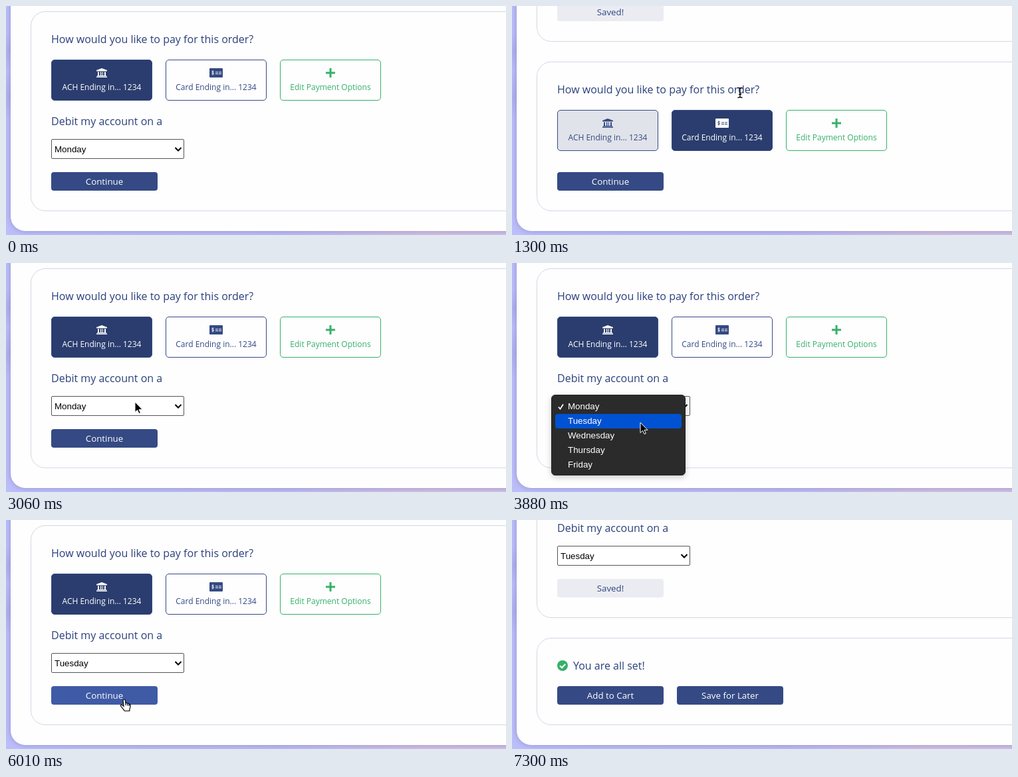
Recreate the animation shown at these times as an HTML page. Size 752 by 346 pixels, loop 7770 ms.

```html
<!DOCTYPE html>
<html lang="en">
<head>
<meta charset="utf-8">
<title>Payment options</title>
<style>
html, body { margin: 0; width: 100%; height: 100%; overflow: hidden; }
body {
  position: relative; color: #2b407c; font: 16px/24px "Open Sans", sans-serif;
  background: linear-gradient(155deg, transparent 12%, #9c9ee066 20%, transparent 28%, #9c9ee066 40%, transparent 50%) 0 0 / 7px 346px no-repeat,
    linear-gradient(90deg, #bcbefa, #bcbaf3 55%, #d3c0e2 85%, #cfc0e6);
}
div, svg { position: absolute; box-sizing: border-box; white-space: nowrap; }
#sheet { left: 7px; top: -40px; width: 800px; height: 380px; border-radius: 22px; background: #fefefe; overflow: hidden; box-shadow: 0 0 9px #5a5ca070; }
#page { left: -7px; top: 40px; width: 800px; height: 346px; }
.panel { left: 37px; width: 800px; border: 1px solid #d2d8e5; border-radius: 22px; }
.main { width: 160px; height: 28px; border-radius: 4px; background: #354a84; color: #fff; font-size: 13.333px; line-height: 28px; text-align: center; }
.main.hover { background: #3f5ba6; }
.main.saved { background: #ebecf2; color: #2f4580; }
.option { top: 72px; width: 152px; height: 62px; border: 1px solid #354a84; border-radius: 5px; color: #354a84; font-size: 12px; line-height: 20px; padding-top: 31px; text-align: center; }
.option svg { left: 63px; top: 11px; width: 24px; height: 16px; fill: currentColor; }
#edit { left: 374px; color: #35b06a; border-color: #35b06a; }
#debit { left: 68px; width: 220px; overflow: hidden; }
#select { top: 38px; width: 200px; height: 30px; border: 1px solid #555; border-radius: 2px; background: #fff; }
#select, #menu { font: 13.333px/28px "Liberation Sans", Arial, sans-serif; color: #000; }
#value { left: 4px; top: 1px; }
#menu { left: 59px; top: 199px; width: 202px; height: 122px; border: 1px solid #202020; border-radius: 6px; background: #2b2b2b; box-shadow: 0 3px 10px #0003; color: #fff; }
.row { left: 5px; width: 190px; height: 22px; padding-left: 19px; border-radius: 4px; line-height: 22px; }
.row.on { background: #0052d2; }
</style>
</head>
<body>
<div id="sheet"><div id="page">
  <div class="panel" id="before" style="height:300px"></div>
  <div class="main saved" id="earlier" style="left:68px">Saved!</div>
  <div class="panel" id="pay">
    <div style="left:30px;top:29px">How would you like to pay for this order?</div>
    <div class="option" id="ach" style="left:30px">
      <svg viewBox="-4 0 24 16"><path d="M8 1l8 3v1.500H0V4zM2 6.500h2V12h2V6.500h1.500V12h1.500V6.500h1V12h2V6.500h2V12h1v1H1v-1h1zM0 13.500h16V15H0z"/></svg>ACH Ending in... 1234</div>
    <div class="option" id="card" style="left:202px">
      <svg viewBox="0 0 24 16"><rect x="2" y="1" width="20" height="14" rx="1"/><g id="ink" fill="none"><path d="M11 7h4m1 0h4M11 9.500h4m1 0h4" stroke-width="1.200"/><path d="M8.500 6C7 5 5 6 6 7.300c.6.7 2.500.3 2.500 1.600C8.300 10.300 6.500 10 5.500 9.500M7 4.500v7" stroke-width=".9"/></g></svg>Card Ending in... 1234</div>
    <div class="option" id="edit">
      <svg viewBox="0 0 24 16"><path d="M10.500 1h3v5.500H19v3h-5.500V15h-3V9.500H5v-3h5.500z"/></svg>Edit Payment Options</div>
  </div>
  <div id="debit">
    <div style="top:-1px">Debit my account on a</div>
    <div id="select"><div id="value"></div>
      <svg style="left:184px;top:10px" width="12" height="9"><path d="M1.500 2L6 6.500 10.500 2" fill="none" stroke="#000" stroke-width="2"/></svg></div>
  </div>
  <div class="main" id="next" style="left:68px;top:251px"></div>
  <div class="panel" style="top:340px;height:132px">
    <svg style="left:30px;top:33px" width="16" height="16"><circle cx="8" cy="8" r="8" fill="#35b06a"/><path d="M4 8.200l3 3 5.200-5.400" fill="none" stroke="#fff" stroke-width="2"/></svg>
    <div style="left:54px;top:29px">You are all set!</div>
    <div class="main" id="add" style="left:30px;top:72px">Add to Cart</div>
    <div class="main" style="left:210px;top:72px">Save for Later</div>
  </div>
</div></div>
<div id="menu"><svg style="left:9px;top:12px" width="10" height="10"><path d="M1 5.500L3.500 8.500 8 1.500" fill="none" stroke="#fff" stroke-width="1.700"/></svg></div>
<svg width="752" height="346" style="left:0;top:0"><g id="cursor">
  <path id="arrow" d="M0 0V15.500L3.600 12.200 6 17.500 8.400 16.500 6 11.300H11Z" stroke="#fff"/>
  <path id="hand" d="M-2 1.500C-1.500-.5 1-.5 1.300 1.500L2 6C3 5 4.500 5.400 4.800 6.600 5.800 5.900 7 6.400 7.200 7.500 8.400 7.100 9.200 7.900 9.200 9.100 9.200 12 8.900 13 7.800 15V17.500H.3C-1.500 14.500-3.500 12.500-5.500 10-6.300 8.700-4.700 7.600-3.500 8.600L-1 10.500ZM2 6V9M4.800 7V9.500M7.200 8V10" fill="#fff" stroke="#000" stroke-width="1.200"/>
  <path id="beam" d="M-3.500-7.500Q-.5-7.500 0-6 .5-7.500 3.500-7.500M0-6V6M-3.500 7.500Q-.5 7.500 0 6 .5 7.500 3.500 7.500M-2 2.500H2" fill="none" stroke="#000" stroke-width="1.300"/>
</g></svg>
<script>
const LOOP = 7770, STEPS = 66;
const $ = id => document.getElementById(id);
// cursor waypoints: step, x, y
const PATH = [
  [1, 640, 232], [3, 505, 170], [5, 385, 140], [7, 343, 131], [11, 343, 131],
  [14, 310, 195], [16, 299, 205], [20, 208, 201], [22, 208, 201], [26, 194, 210],
  [28, 194, 212], [35, 192, 253], [36, 187, 246], [40, 187, 246], [46, 178, 270],
  [47, 178, 271], [59, 178, 271], [60, 430, 300], [61, 674, 312]
];

const rows = ['Monday', 'Tuesday', 'Wednesday', 'Thursday', 'Friday'].map((day, i) => {
  const row = document.createElement('div');
  row.className = 'row';
  row.textContent = day;
  row.style.top = 6 + 22 * i + 'px';
  $('menu').append(row);
  return row;
});

function cursorAt(k) {
  const i = PATH.findIndex(p => p[0] >= k);
  if (k < 1 || i < 0) return null;
  const b = PATH[i], a = PATH[i - 1] || b;
  const u = a === b ? 0 : (k - a[0]) / (b[0] - a[0]);
  return [1, 2].map(c => a[c] + (b[c] - a[c]) * u);
}

function ease(n) {
  if (n < 0) return 0;
  const v = 1 - (1 - Math.min(1, .135 + .35 * n)) ** 3;
  return v > .99 ? 1 : v;
}

function paint(id, fill, hover) {
  const el = $(id);
  el.style.background = hover ? '#42588f' : `rgba(43,61,110,${fill})`;
  el.style.color = hover || fill > .5 ? '#fff' : '#354a84';
  return hover || fill > .5;
}

function draw(k) {
  const byCard = k >= 10 && k < 22;
  const fold = k < 22 ? ease(k - 10) : 1 - ease(k - 22);
  const scroll = Math.round(162 * ease(k - 52));
  const top = Math.round(8 + 88 * fold);
  const open = k >= 28 && k < 42, saved = k >= 52;
  const pos = cursorAt(k);
  const over = (x, y, w, h) => !!pos && !open &&
    pos[0] >= x && pos[0] < x + w && pos[1] >= y && pos[1] < y + h;

  $('page').style.transform = `translateY(${-scroll}px)`;
  $('before').style.top = top - 330 + 'px';
  $('earlier').style.top = top - 89 + 'px';
  $('pay').style.top = top + 'px';
  $('pay').style.height = 310 - top + 'px';
  $('debit').style.top = top + 155 + 'px';
  $('debit').style.height = 96 - top + 'px';
  $('debit').style.opacity = Math.max(0, 1 - 1.16 * fold);
  $('value').textContent = k < 41 ? 'Monday' : 'Tuesday';

  const onAch = !saved && over(68, top + 73, 152, 62);
  const onCard = !saved && over(240, top + 73, 152, 62);
  const onMain = over(68, 251, 160, 28);
  paint('ach', byCard ? 1 - fold : 1, byCard && onAch);
  const solid = paint('card', byCard ? 1 : fold, !byCard && onCard);
  $('ink').style.stroke = solid ? '#2b3d6e' : '#fff';

  $('next').textContent = saved ? 'Saved!' : 'Continue';
  $('next').className = 'main' + (saved ? ' saved' : onMain ? ' hover' : '');
  $('add').className = 'main' + (scroll === 162 && onMain ? ' hover' : '');

  $('menu').style.display = open ? '' : 'none';
  $('menu').style.opacity = k < 40 ? 1 : k < 41 ? .6 : .2;
  rows.forEach((row, i) => row.classList.toggle('on', !!pos && i === Math.floor((pos[1] - 206) / 22)));

  $('cursor').style.display = pos ? '' : 'none';
  if (!pos) return;
  $('cursor').setAttribute('transform', `translate(${pos.map(Math.round)})`);
  const shape = onAch || onCard || onMain ? 'hand' :
    !saved && over(68, top + 30, 306, 24) ? 'beam' : 'arrow';
  for (const id of ['arrow', 'hand', 'beam']) $(id).style.display = id === shape ? '' : 'none';
}

const start = performance.now();
function tick() {
  const t = (performance.now() - start) % LOOP;
  draw(Math.min(STEPS - 1, Math.floor((t + 8) * STEPS / LOOP)));
  requestAnimationFrame(tick);
}
tick();
</script>
</body>
</html>
```
